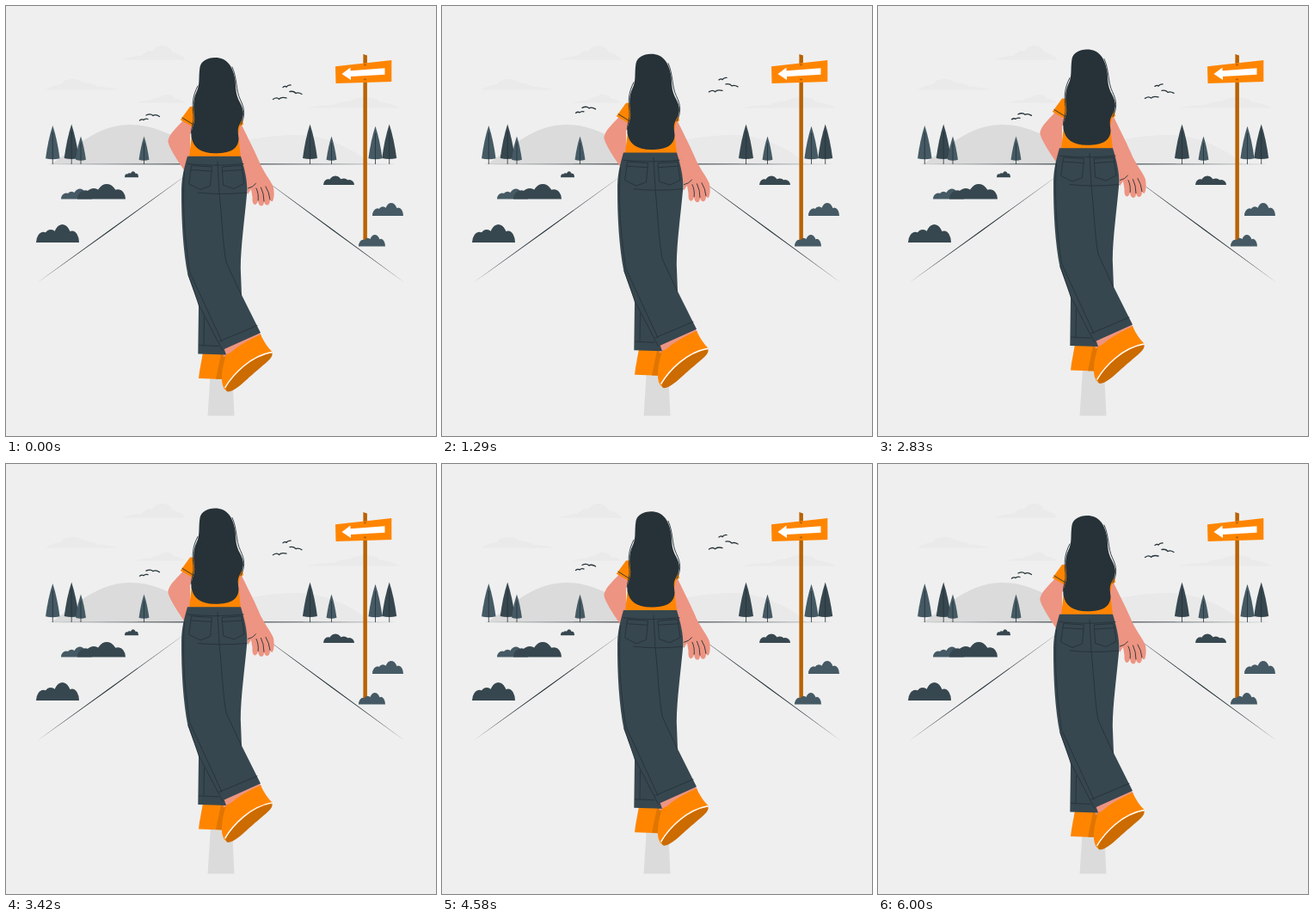
These frames come from a looping animation (500 px wide and 500 px high, 6.04 s). An HTML page:

```html
<!DOCTYPE html>
<html lang="en">
<head>
<meta charset="utf-8">
<title>Walking down the road</title>
<style>
  html, body { margin: 0; width: 100%; height: 100%; overflow: hidden; background: #efefef; }
  svg { display: block; width: 100vw; height: 100vh; }
  .line { fill: none; stroke: #263238; stroke-width: .9; stroke-linecap: round; stroke-linejoin: round; }
  #birds { stroke-width: 1.3; }
  .ink { fill: #263238; }
  .orange { fill: #ff8500; }
  .skin { fill: #ed9482; }
  .denim { fill: #37474f; }
  .post { fill: #b96200; }
</style>
</head>
<body>
<svg viewBox="0 0 500 500">
  <g id="clouds" fill="#eaeaea"></g>
  <path fill="#e9e9e9" d="M250 184V162C280 155 310 150 337 150C370 150 400 163 424 184Z"/>
  <path fill="#dbdbdb" d="M52 184C70 173 85 158 101 150C127 135 155 134 185 147C203 154 220 166 234 184Z"/>
  <path class="ink" d="M40 184L250 183.2L461 184L250 184.5Z"/>
  <path fill="#dbdbdb" d="M238.5 415H262.5L265.5 476.5H234.5Z"/>
  <path class="ink" d="M36 322L120 260.8L215 192.8L120 262.2ZM464 322L380 259.8L290 194.3L380 261.2Z"/>
  <g id="trees"></g>
  <path class="post" d="M415.4 56L419.9 57.5V272H415.4Z"/>
  <path class="orange" d="M383 70.3L448.3 63V88L383.5 90Z"/>
  <path fill="#fff" d="M390.5 79L400.5 71.5V75.2L440.5 72.3V79.8L401 82V86Z"/>
  <path class="post" d="M416 67.5h3v1.8h-3zM416 84.5h3v1.8h-3z"/>
  <g id="bushes"></g>

  <g id="birds" class="line">
    <path d="M322 94.5Q325 92.5 326 94.200Q328 91.500 331 92"/>
    <path d="M330 99.500Q334.500 98.500 337 101.500Q340 100 344 102.500"/>
    <path d="M310.500 108.500Q315 105.500 317.500 108.300Q320 105.500 326 107"/>
    <path d="M163 127Q168 124.500 171 127.500Q174 125.500 178.500 128.500"/>
    <path d="M155.500 133Q158 131 160 132.500Q162 130.500 165 131.500"/>
  </g>

  <g id="walker">
    <path class="skin" d="M206 133C199 141 190 148 188.300 157C189.500 165 198 177 207 191L214 184V150L218 138Z"/>
    <path class="skin" d="M268 138H274C279 149 288 166 294 180C298 191 308 203 311 211C312 217 312 223 310 227Q308 228 307 225Q307 230 304.500 231.500Q301 232 300 227Q300 232 297 232.500Q293.500 232 293 226Q292 231 289 231Q286 230 286.500 222L285 213L281 219L280 205L270 175Z"/>
    <path class="line" d="M281.500 212Q287 211 290.500 206.500M291 212Q294 218 293.200 226M296.500 211Q300 218 300 227M302 210Q306 216 307 225"/>
    <path class="orange" d="M214 117L202.800 132.500L217 140.500L213 175.500H273L270 150L272 140L276 137.500L272 118Z"/>
    <path class="line" d="M205 130L218 138"/>

    <path class="orange" d="M229 403L225 425L224 433L252 434L258 404Z"/>
    <path fill="#e07500" d="M250 405L244 433.700L253 434L260 404Z"/>
    <path class="skin" d="M251 399L253 408L275 398L297 383L294 379Z"/>
    <path class="orange" d="M256 405Q261 404 267 398Q280 389 296 382Q302 395 309.500 402L300 415L259 448Q252 447 251 436Q250 424 256 405Z"/>
    <path fill="#cb6b00" d="M309.500 403.500C311 409 302 415 293 423C279 434 268 448 258 448.500C253 447 257 440 264 432C278 417 291 407 309.500 403.500Z"/>
    <path fill="none" stroke="#fff" stroke-width="1.400" d="M254.500 444C264 428 284 407 309 402.500"/>

    <path class="denim" d="M223 340L224 350L223.300 404.500L256 405.500L252 394L240 345Z"/>
    <path class="line" d="M230.500 362L230 394M224.500 394.500L247 395.500"/>
    <path class="denim" d="M211 174.800H273C277 188 280.500 202 280.500 214C277.500 248 273 278 272.800 305L274 336L296 380L251.500 400L224 347L211.500 313C206 285 203.800 250 204 213C204.500 198 207.500 187 211 174.800Z"/>
    <path class="line" d="M212 312L224 347L251.500 400M207.500 192C206 215 205 250 213.500 309L251 390M248 390L292 371.500"/>
    <path class="line" d="M246 181L248 218C251 245 252 276 256 298L273.500 336"/>
    <path class="line" d="M211 183.500Q243 187 276 183.500M223 217Q250 220 280 217"/>
    <path class="line" d="M216 185.500L239.500 187L237.500 209L226 213.500L213 207ZM215 190.500L239 192M251.500 187L274 185.500L277 206.500L265 212.500L253 208.500ZM251.500 192L275 190.500"/>

    <path class="ink" d="M243 60C234 60 227 64 225.500 71C223.500 84 226 91 221.500 100C217 110 218 117 219 127C220.500 138 214.500 142 215.500 152C217.500 165 227 171.300 243 171.300C261 171.300 270.500 166 270.500 154C270 147 268.500 143 272 137C277.500 128 277 122 272.500 113C266.500 103 267.500 95 266.500 86C264 70 257 60 243 60Z"/>
    <path class="line" d="M263 71C269 84 267 98 272.500 109C278 120 278 129 273 138M223 93C216.500 105 216.500 116 218 127C219 135 215.500 140 215.300 148"/>
  </g>
</svg>
<script>
const $ = id => document.getElementById(id);
const DARK = '#37474f', LIGHT = '#455a64';

// One cloud outline on a 100 x 100 box; a negative width mirrors it
const cloud = (x, base, w, h) =>
  `<path transform="translate(${x} ${base}) scale(${w / 100} ${h / 100})"
    d="M0 0Q14 -27 29 -27Q38 -65 47 -62Q58 -108 66 -95Q76 -90 79 -50Q92 -45 100 0Z"/>`;

// Conifer of relative size s standing on the horizon
function tree(x, s, fill) {
  const base = 184 - 6 * s, top = base - 40.5 * s, w = 8.5 * s, mid = top + 17 * s;
  return `<path fill="${fill}" d="M${x} ${top}Q${x + w * .65} ${mid} ${x + w} ${base - 1}
    Q${x} ${base + 1} ${x - w} ${base - 1}Q${x - w * .65} ${mid} ${x} ${top}Z"/>
    <path stroke="#263238" stroke-width=".8" d="M${x} ${top + 8}V184"/>`;
}

// Bush of four half ellipses: [centre, radius, height] as shares of its size
const BUMPS = [[.17, .17, .58], [.34, .19, .72], [.61, .23, 1], [.84, .16, .64]];
const bush = (x, base, w, h, fill) => `<path fill="${fill}" d="` + BUMPS.map(([c, r, k]) =>
  `M${x + (c - r) * w} ${base}a${Math.abs(r * w)} ${h * k} 0 0 ${w > 0 ? 1 : 0} ${2 * r * w} 0z`).join('') + '"/>';

$('clouds').innerHTML = cloud(136, 62.5, 73, 17) + cloud(131, 97.5, -85, 13) +
  cloud(151, 112.5, 57, 10) + cloud(349, 118.5, 109, 13);

$('trees').innerHTML = tree(54.3, .97, LIGHT) + tree(76.2, 1, DARK) + tree(87, .7, LIGHT) +
  tree(160.5, .7, LIGHT) + tree(353.5, 1, DARK) + tree(378.5, .7, LIGHT) +
  tree(429.5, .95, LIGHT) + tree(445.7, 1, DARK);

$('bushes').innerHTML = bush(35, 275, 50, 21, DARK) + bush(64, 224.5, 36, 12, LIGHT) +
  bush(83, 224.5, 56, 17.5, DARK) + bush(138, 199.3, 16, 7, DARK) + bush(405, 208, -36, 10.5, DARK) +
  bush(426, 244, 36, 15, LIGHT) + bush(410, 279.5, 31, 13.5, LIGHT);

// Linear rise of 10 units and return over one period
const lift = (t, period) => -10 * (1 - Math.abs(1 - 2 * (t % period) / period));
const move = (id, y) => $(id).setAttribute('transform', `translate(0 ${y})`);

function draw() {
  const t = Math.min(performance.now() % 6040, 6000);
  move('walker', lift(t, 6000));
  move('birds', lift(t, 3000));
  requestAnimationFrame(draw);
}
draw();
</script>
</body>
</html>
```
